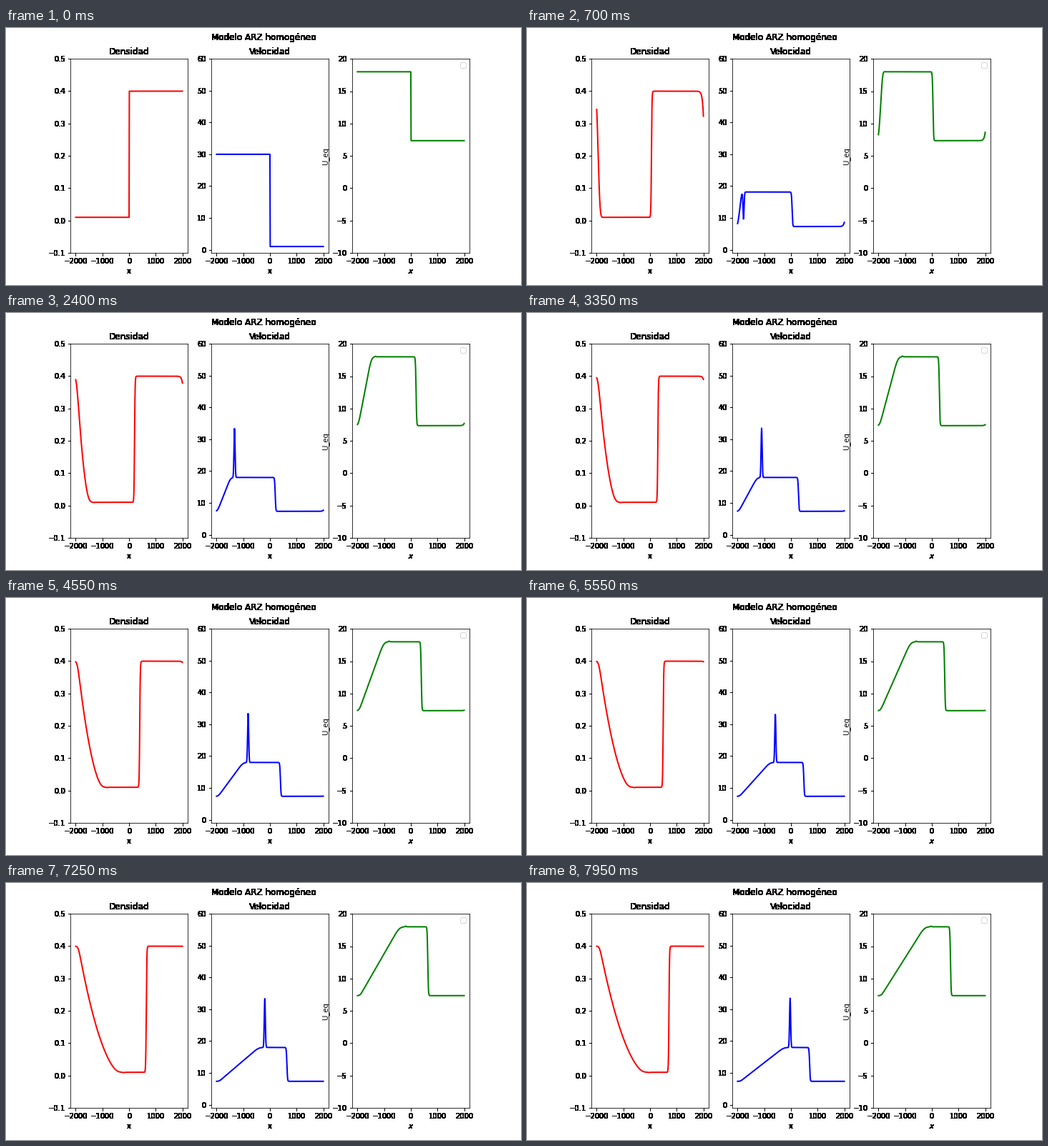
A matplotlib script for the animation above (8 s loop, 720 px wide and 360 px high).

```python
import math
import numpy as np
import matplotlib.pyplot as plt
from matplotlib.animation import FuncAnimation

FRAMES, INTERVAL = 160, 50
DT = 0.64                      # simulated seconds per frame
R_LOW, R_HIGH = 0.01, 0.4
X = np.linspace(-2000, 2000, 401)
erf = np.vectorize(math.erf)


def speed(rho):
    return 20 * (1 - np.sqrt(rho))


U_HIGH, U_LOW = speed(R_LOW), speed(R_HIGH)


def gauss(d, width):
    return np.exp(-0.5 * (d / width) ** 2)


def soft_ramp(d, width):
    """max(d, 0) blurred by a Gaussian."""
    z = d / width
    return (width * gauss(z, 1) / math.sqrt(2 * math.pi)
            + d * 0.5 * (1 + erf(z / math.sqrt(2))))


def spike_height(t):
    if t < 11.5:
        return -11 * t / 11.5
    return 15.4 - 26.4 * math.exp(-((t - 11.5) / 10.9) ** 4)


def state(t):
    """Density, velocity and equilibrium velocity at time t."""
    if t == 0:
        rho = np.where(X <= 0, R_LOW, R_HIGH)
        return rho, np.where(X <= 0, 30.0, 1.0), speed(rho)

    # rarefaction fan entering from the left edge
    tail = -2000 + (1.5 * U_LOW - 10) * t
    head = -2000 + (1.5 * U_HIGH - 10) * t
    lead = 137 * (1 - math.exp(-t / 15)) + t
    contact = head + lead
    blur = 50 * (1 - math.exp(-t / 5))
    fan = U_LOW + (soft_ramp(X - tail, blur)
                   - soft_ramp(X - head, 0.45 * lead)) / (1.5 * t)
    fan = np.clip(fan, U_LOW, U_HIGH)
    fan = fan + 0.1 * min(1, t / 40) * gauss(X - contact, 20)

    # congested side, disturbed at the right edge
    edge = 0.77 * math.exp(-0.0635 * (t - 17.9)) * (1 - math.exp(-t / 3))
    jam = U_LOW + edge * np.exp((X - 2000) / 40)

    shock = 7.078 * t - 12 * (1 - math.exp(-t / 2))
    mix = 0.5 * (1 + np.tanh((X - shock) / 20))
    rho = (1 - mix) * (1 - fan / 20) ** 2 + mix * (1 - jam / 20) ** 2
    u = speed(rho)

    start = 1 + 29 * (u - U_LOW) / (U_HIGH - U_LOW)
    v = u + (start - u) * math.exp(-t / 2)
    v = v + spike_height(t) * gauss(X - contact, 20)
    return rho, v, u


def harden(img, dpi):
    """Turn every touched pixel solid black, for heavy unsmoothed lettering."""
    out = np.zeros_like(img)
    out[..., 3] = img[..., 3] > 0
    return out, 0, 0


fig, axes = plt.subplots(1, 3, figsize=(10, 5), dpi=72)
fig.subplots_adjust(left=0.125, right=0.9, bottom=0.125, top=0.88, wspace=0.2)
fig.suptitle("Modelo ARZ homogéneo").set_agg_filter(harden)

panels = [
    ("Densidad", "x", "red", (-0.1, 0.5), np.arange(-1, 6) / 10),
    ("Velocidad", "x", "blue", (-1, 60), np.arange(0, 61, 10)),
    ("", "$x$", "green", (-10, 20), np.arange(-10, 21, 5)),
]
lines = []
for ax, (title, xlabel, color, ylim, yticks) in zip(axes, panels):
    lines += ax.plot(X, np.zeros_like(X), color=color, lw=2)
    ax.set(xlim=(-2200, 2200), ylim=ylim, xlabel=xlabel,
           xticks=range(-2000, 2001, 1000), yticks=yticks)
    if title:
        ax.set_title(title).set_agg_filter(harden)
    ax.xaxis.set_agg_filter(harden)
    ax.yaxis.set_agg_filter(harden)

axes[2].legend([], [], loc="upper right")
fig.text(451.8 / 720, 1 - 179.1 / 360, "U_eq", rotation=90, ha="center",
         va="bottom", rotation_mode="anchor")


def update(i):
    for line, y in zip(lines, state(i * DT)):
        line.set_ydata(y)
    return lines


anim = FuncAnimation(fig, update, frames=FRAMES, interval=INTERVAL,
                     repeat=True, repeat_delay=0)
plt.show()
```
